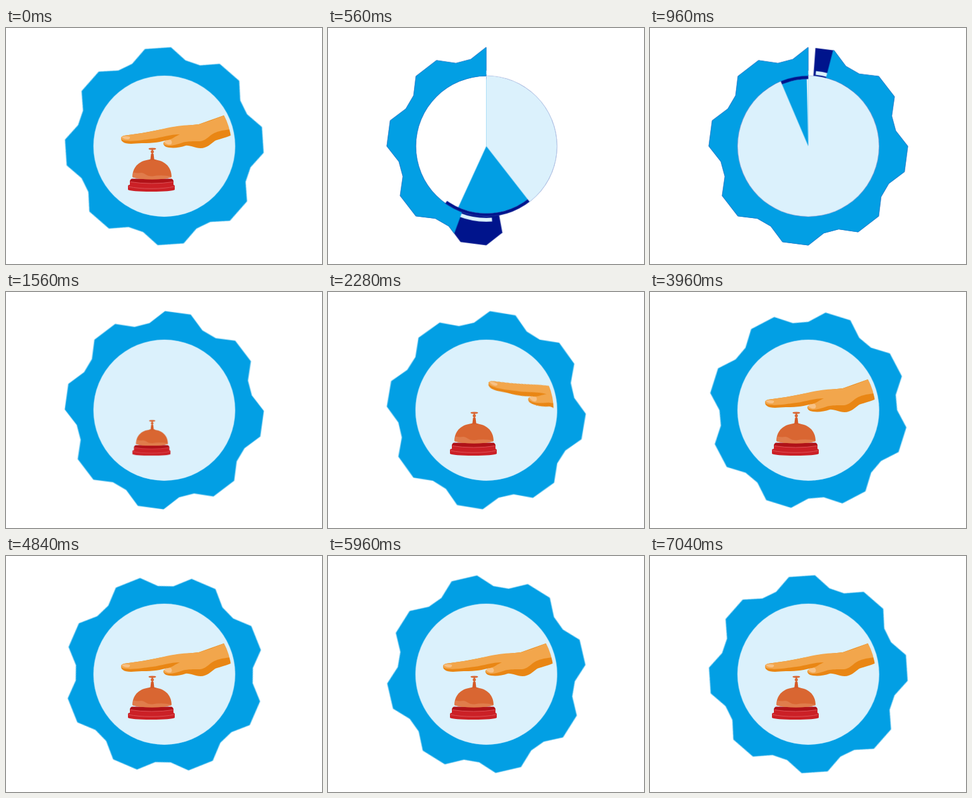
An HTML page that plays this animation: 500x375 px, repeating every 7.08 s.

```html
<!DOCTYPE html>
<html lang="en">
<head>
<meta charset="utf-8">
<title>Service bell</title>
<style>
  html, body { margin: 0; width: 100%; height: 100%; overflow: hidden; background: #fff; }
  svg { display: block; width: 500px; height: 375px; }

  .star, .wipe, .bell, .hand, .whole, .brief {
    animation: 7080ms cubic-bezier(.333, 0, .667, 1) infinite;
  }

  /* slow turn of the badge, still speeding up when the loop ends */
  .star { animation-name: turn; }
  @keyframes turn {
    0% { transform: rotate(33.8deg); animation-timing-function: step-end; }
    .565% { transform: rotate(0deg); }
    14.124% { transform: rotate(0deg); animation-timing-function: cubic-bezier(.333, 0, .667, .483); }
    99.435%, 100% { transform: rotate(33.8deg); }
  }

  /* radial wipes */
  .wipe { fill: none; stroke: #fff; stroke-width: 180; stroke-dasharray: 360 400; }
  #rimWipe .wipe { animation-name: rim; }
  #discWipe .wipe { animation-name: disc; }
  #darkWipe .wipe { animation-name: dark; }
  #bandWipe .wipe { animation-name: band; }
  #ringWipe .wipe { animation-name: ring; }
  #faceWipe .wipe { animation-name: face; }
  @keyframes rim {
    0% { stroke-dashoffset: 0; animation-timing-function: step-end; }
    .565% { stroke-dashoffset: 360; }
    13.56%, 100% { stroke-dashoffset: 0; }
  }
  @keyframes disc {
    0% { stroke-dashoffset: 0; animation-timing-function: step-end; }
    .565% { stroke-dashoffset: 360; }
    14.05%, 100% { stroke-dashoffset: 0; }
  }
  @keyframes dark {
    0% { stroke-dashoffset: 0; animation-timing-function: step-end; }
    .565%, .88% { stroke-dashoffset: 360; }
    14.44%, 100% { stroke-dashoffset: 0; }
  }
  @keyframes band {
    0% { stroke-dashoffset: 0; animation-timing-function: step-end; }
    .565%, 1.02% { stroke-dashoffset: 360; }
    14.6%, 100% { stroke-dashoffset: 0; }
  }
  @keyframes ring {
    0% { stroke-dashoffset: 0; animation-timing-function: step-end; }
    .565%, 1.65% { stroke-dashoffset: 360; }
    15.21%, 100% { stroke-dashoffset: 0; }
  }
  @keyframes face {
    0% { stroke-dashoffset: 0; animation-timing-function: step-end; }
    .565%, 2.1% { stroke-dashoffset: 360; }
    15.66%, 100% { stroke-dashoffset: 0; }
  }

  /* layers seen only during the wipes, and the full cover after them */
  .brief { animation-name: brief; animation-timing-function: step-end; }
  .whole { fill: #fff; animation-name: whole; animation-timing-function: step-end; }
  @keyframes brief {
    0% { opacity: 0; }
    .565% { opacity: 1; }
    15.8%, 100% { opacity: 0; }
  }
  @keyframes whole {
    0% { opacity: 1; }
    .565% { opacity: 0; }
    15.8%, 100% { opacity: 1; }
  }

  .bell { transform-origin: 230.5px 260px; animation-name: grow; }
  @keyframes grow {
    0% { transform: scale(1); animation-timing-function: step-end; }
    .565%, 16.95% { transform: scale(0); }
    24%, 100% { transform: scale(1); }
  }

  .hand { transform-origin: 182px 176px; animation-name: press; }
  @keyframes press {
    0% { transform: translate(0, 0) rotate(0deg); animation-timing-function: step-end; }
    .565%, 25.42% { transform: translate(175px, -75px) rotate(36deg); }
    37.57%, 41.67% { transform: translate(0, 0) rotate(0deg); }
    45.2% { transform: translate(0, 12px) rotate(0deg); }
    48.73%, 100% { transform: translate(0, 0) rotate(0deg); }
  }
</style>
</head>
<body>
<svg viewBox="0 0 500 375">
  <defs>
    <path id="gear" fill-rule="evenodd"/>
    <circle id="cw" r="90" pathLength="360" transform="rotate(-90)"/>
    <circle id="ccw" r="90" pathLength="360" transform="scale(-1 1) rotate(-90)"/>
    <rect id="all" x="-200" y="-200" width="400" height="400"/>
    <clipPath id="window"><circle cx="250.5" cy="187.8" r="106.5"/></clipPath>
    <g id="masks"></g>
  </defs>

  <g transform="translate(250.5 187.8)">
    <g class="brief">
      <g mask="url(#darkWipe)"><use href="#gear" class="star" fill="#00148c"/></g>
      <circle r="117" fill="none" stroke="#dbf1fc" stroke-width="6" mask="url(#bandWipe)"/>
    </g>
    <g mask="url(#ringWipe)"><use href="#gear" class="star" fill="#029fe4"/></g>
    <g class="brief">
      <circle r="107" fill="#029fe4" mask="url(#discWipe)"/>
      <circle r="109.3" fill="none" stroke="#00148c" stroke-width="5" mask="url(#rimWipe)"/>
    </g>
    <circle r="112" fill="#dbf1fc" mask="url(#faceWipe)"/>
  </g>

  <g class="bell">
    <path fill="#cb2026" d="M193 251Q193 249 197 249H263Q267 249 267 251V257Q262 260 230 260Q198 260 193 257Z"/>
    <path fill="#cb2026" d="M196 243H265V253Q250 255.5 230 255.5Q210 255.5 196 253Z"/>
    <path fill="#b01218" d="M199 239.5H262Q265 241 265 244Q250 247 230.500 247Q211 247 196 244Q196 241 199 239.500Z"/>
    <path fill="none" stroke="#dd5257" stroke-width="1" d="M197 244.500Q212 247 230.500 247T264 244.500M194 252Q208 255.200 230 255.200T266 252"/>
    <path fill="#d96632" d="M200 237C200 220 212 209 231 209S262 220 262 237Q252 240.500 231 240.500T200 237Z"/>
    <path fill="#e07c4b" d="M200 237Q200.500 232 202 229.500Q208 231 214 230C222 231 221 236 232 235.500Q246 233 262 236V237Q252 240.500 231 240.500T200 237Z"/>
    <path fill="#d45a27" d="M229.500 200H233.500L234.500 208.500Q237 209 238 210H225Q226 209 228.500 208.500Z"/>
    <path fill="#d96632" d="M230.300 192H232.700V200H230.300Z"/>
    <ellipse cx="231.500" cy="196.700" rx="2.600" ry="2.200" fill="#d96632"/>
    <ellipse cx="231.500" cy="192" rx="6" ry="1.600" fill="#d96632"/>
  </g>

  <g clip-path="url(#window)">
    <g class="hand">
      <path fill="#e98614" d="M182 176Q182 172 187 171L215 167L268 157L305 153L375 128L390 161L355 171
        C345 175 336 177 331 179C324 184 318 191 308 191C298 191 292 186 284 187C276 190 266 191 258 190
        C251 189 249 186 249 183Q250 180 256 178C244 181 235 183 215 183C200 184 190 185 185 181Q182 179 182 176Z"/>
      <path fill="#f2a64c" d="M182 175Q182 172 187 171L215 167C236 164 250 159 268 156.500C280 154 292 155 305 153
        C320 149 332 144 345 139L375 128L388 149L354 161C341 163 334 164 326 169C319 174 315 179 307 180
        C296 180 288 180 281 181.500C272 185 264 187 257 187Q249 186 249 182.500Q251 179 258 177.500
        C264 176 268 172 275 169C260 169 246 174 232 176C216 178 198 181 189 179Q182 178 182 175Z"/>
      <path fill="#f7c185" d="M183 173Q189 171 196 173Q197 176 193 177Q186 177 183 173ZM250 181Q255 177 261 178Q264 182 261 185Q254 186 250 181Z"/>
    </g>
  </g>
</svg>
<script>
  const polar = (r, deg) => {
    const a = deg * Math.PI / 180;
    return `${(r * Math.sin(a)).toFixed(2)} ${(-r * Math.cos(a)).toFixed(2)}`;
  };

  // eight flat teeth joined by flat valleys, with a round hole
  const points = [];
  for (let a = 0; a < 360; a += 45) {
    points.push(polar(157.5, a), polar(157.5, a + 15), polar(140.5, a + 25), polar(140.5, a + 35));
  }
  const hole = 'M0 -111.5A111.5 111.5 0 1 0 0 111.5A111.5 111.5 0 1 0 0 -111.5Z';
  document.getElementById('gear').setAttribute('d', `M${points.join('L')}Z${hole}`);

  const wipes = { rim: 'cw', disc: 'cw', face: 'cw', dark: 'ccw', band: 'ccw', ring: 'ccw' };
  document.getElementById('masks').innerHTML = Object.entries(wipes).map(([name, turn]) =>
    `<mask id="${name}Wipe" maskUnits="userSpaceOnUse" x="-200" y="-200" width="400" height="400">
      <use href="#${turn}" class="wipe"/><use href="#all" class="whole"/>
    </mask>`).join('');
</script>
</body>
</html>
```
